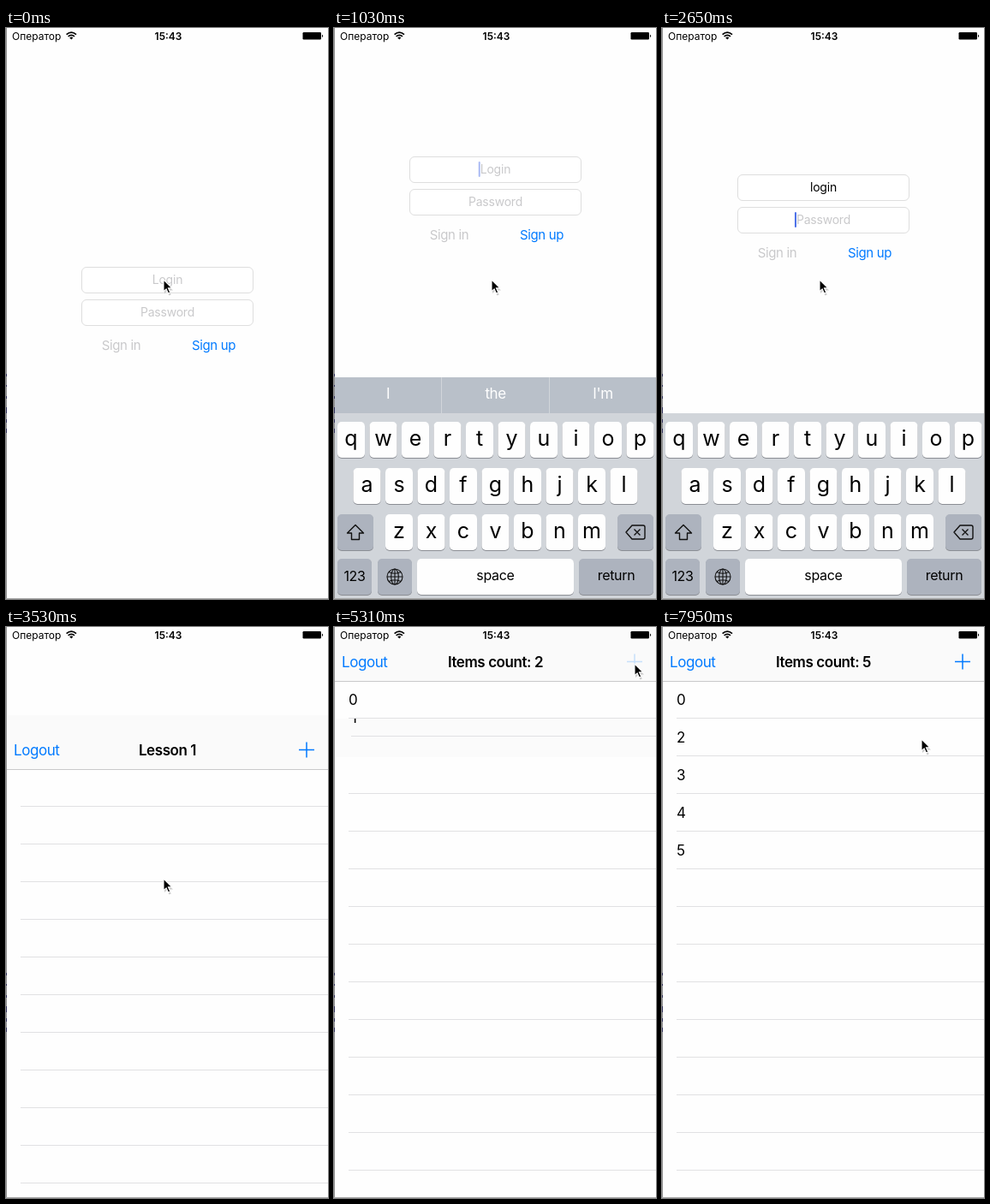
An HTML page for the animation above (8000 ms loop, 376x667 px).

```html
<!DOCTYPE html>
<html lang="en">
<head>
<meta charset="utf-8">
<title>Login and list</title>
<style>
  html, body { margin: 0; width: 100%; height: 100%; overflow: hidden; background: #fefefe; }
  svg { display: block; width: 100%; height: 100%; }
  text { font: 17px Inter, Roboto, sans-serif; letter-spacing: -.025em; white-space: pre; }
  .mid { text-anchor: middle; }
  .bold { font-weight: 600; }
  .small { font-size: 14px; letter-spacing: -.015em; }
  .link { font-size: 15px; }
  .status { font-size: 12px; letter-spacing: 0; }
  .letter { font-size: 25px; letter-spacing: 0; }
  .label { font-size: 16px; letter-spacing: -.02em; }
  .blue { fill: #007aff; }
  .hint { fill: #c9c9cb; }
  .field { fill: #fff; stroke: #dedede; }
  .icon { fill: none; stroke: #111; stroke-width: 1.4; stroke-linejoin: round; }
</style>
</head>
<body>
<svg viewBox="0 0 376 667">
  <rect width="376" height="667" fill="#fefefe"/>
  <g id="form">
    <rect class="field" x="88.5" y="279.5" width="200" height="30" rx="5.5"/>
    <rect class="field" x="88.5" y="317.5" width="200" height="30" rx="5.5"/>
    <text id="login" class="small mid" x="188.5" y="299"></text>
    <text id="password" class="small mid" x="188.5" y="337"></text>
    <text id="signIn" class="link mid" x="134.5" y="376">Sign in</text>
    <text class="link mid blue" x="242.5" y="376">Sign up</text>
    <rect id="caret" width="2" height="18" rx="1" fill="#4a6ee8"/>
  </g>
  <g id="sheet">
    <rect width="376" height="667" fill="#fefefe"/>
    <g id="list"></g>
    <rect width="376" height="63" fill="#fafafa"/>
    <rect y="63" width="376" height="1" fill="#c9c9ca"/>
    <text class="blue" x="9" y="47">Logout</text>
    <text id="title" class="mid bold" x="188.5" y="47"></text>
    <path id="plus" d="M342 40.5h18M351 31.5v18" stroke="#007aff" stroke-width="1.5"/>
  </g>
  <g id="keyboard"></g>
  <text class="status" x="7" y="13.5">Оператор</text>
  <g fill="none" stroke="#000" stroke-width="1.7">
    <path d="M70.6 7.6q5.7-5 11.4 0M72.6 9.9q3.7-3.2 7.4 0"/>
    <path d="M74.2 11.2q2.1-1.6 4.2 0l-2.1 2.3z" fill="#000" stroke="none"/>
  </g>
  <text class="status bold mid" x="189.5" y="13.5">15:43</text>
  <rect x="346.5" y="5" width="21.5" height="8.5" rx="1.2"/>
  <path d="M369 7.5q2.4 1.8 0 3.6z"/>
  <rect width="1" height="667" fill="#929292"/>
  <path d="M.5 404v3m0 10v2m0 11v3m0 10v7m0 7v4m0 7v5" stroke="#34345e"/>
  <rect y="666" width="376" height="1" fill="#a9a9a9"/>
  <g id="cursor">
    <path d="M1 2V16L4 13.2 6.5 18.5 8.8 17.5 6.4 12.4H11Z" fill="#000" opacity=".2"/>
    <path d="M0 0V13.6L3.1 10.8 5.5 16 7.8 15 5.5 9.9H9.8Z" stroke="#fff" stroke-width="1.1"/>
  </g>
</svg>
<script>
const LOOP = 8000, TICK = 147.2, ROW = 44;
const $ = id => document.getElementById(id);
const clamp = v => Math.max(0, Math.min(1, v));
const ease = v => { v = clamp(v); return v * v * (3 - 2 * v); };
const ramp = (t, start, length) => ease((t - start) / length);
// Critically damped spring, 0 to 1
const spring = ms => {
  const x = Math.max(0, ms) * .01826;
  return 1 - (1 + x) * Math.exp(-x);
};
const move = (id, x, y) => $(id).setAttribute('transform', `translate(${x} ${y})`);
const rect = (x, y, w, h, fill, more = '') =>
  `<rect x="${x}" y="${y}" width="${w}" height="${h}" fill="${fill}" ${more}/>`;
const text = (x, y, str, cls, fill = '#000') =>
  `<text x="${x}" y="${y}" class="${cls}" fill="${fill}">${str}</text>`;

function buildKeyboard() {
  const key = (x, y, w, fill, str = '', cls = 'letter', base = 28) =>
    rect(x, y + 1, w, 42, '#8b8e94', 'rx="5"') + rect(x, y, w, 42, fill, 'rx="5"') +
    text(x + w / 2, y + base, str, cls + ' mid');
  const row = (letters, x, y) =>
    [...letters].map((c, i) => key(x + i * 37.5, y, 32, '#fefefe', c)).join('');
  const grey = '#adb3be';
  const bar = rect(0, 408, 376, 42, '#b9c0c9') +
    rect(125, 408, 1, 42, '#d1d5da') + rect(251, 408, 1, 42, '#d1d5da') +
    ['I', 'the', "I'm"].map((w, i) => text(63 + i * 125.5, 433, w, 'mid', '#fff')).join('');
  $('keyboard').innerHTML = `<g id="bar">${bar}</g>` + rect(0, 450, 376, 217, '#d1d5da') +
    row('qwertyuiop', 4, 460) + row('asdfghjkl', 22.5, 514) + row('zxcvbnm', 60, 568) +
    key(4, 568, 42, grey) + key(331, 568, 42, grey) +
    key(4, 620, 40, grey, '123', 'label', 26) + key(51, 620, 40, grey) +
    key(97, 620, 183, '#fefefe', 'space', 'label', 25) +
    key(286, 620, 87, grey, 'return', 'label', 25) +
    `<g class="icon">
      <path d="M25 580.5l9.5 9.5h-5v7.5h-9v-7.5h-5z"/>
      <path d="M348 581h13q2 0 2 2v12q0 2-2 2h-13l-7-8zM350.5 585.5l7 7m0-7l-7 7"/>
      <g stroke-width="1.1"><circle cx="71" cy="641" r="9"/><ellipse cx="71" cy="641" rx="4.3" ry="9"/>
      <path d="M71 632v18M62 641h18M64 635.500q7 3.500 14 0M64 646.500q7-3.500 14 0"/></g>
    </g>`;
}

const pointer = [
  [0, 184, 294], [3880, 184, 294], [4420, 351, 43], [6010, 351, 43], [6480, 279, 132],
  [6600, 276, 132], [6920, 216, 132], [7210, 312, 132], [7420, 318, 132], [7950, 303, 131]
];
function pointerAt(t) {
  const i = pointer.findIndex(p => p[0] > t);
  const b = pointer[i < 0 ? pointer.length - 1 : i];
  const a = i < 0 ? b : pointer[i - 1];
  const k = a === b ? 0 : ramp(t, a[0], b[0] - a[0]);
  return [a[1] + (b[1] - a[1]) * k, a[2] + (b[2] - a[2]) * k];
}

const FOCUS = 420, TYPE = 1470, TAB = 2200, SUBMIT = 3350, DELETE = 7400;
const inserts = [4705, 5154, 5400, 5600, 5800, 6000];

function drawForm(t) {
  const shown = spring(t - FOCUS) - spring(t - SUBMIT);
  const bar = 1 - ramp(t, TAB - 60, 280);
  move('keyboard', 0, (1 - shown) * 259);
  move('bar', 0, (1 - bar) * 42);
  const lift = Math.round(shown * (217 + 42 * bar) / 2);
  move('form', 0, -lift);

  const typed = 'login'.slice(0, t < TYPE ? 0 : Math.floor((t - TYPE) / TICK) + 1);
  const dots = '•'.repeat(t < 2790 ? 0 : Math.min(5, 2 * Math.floor((t - 2790) / TICK) + 2));
  const fill = (id, value, hint) => {
    $(id).textContent = value || hint;
    $(id).classList.toggle('hint', !value);
  };
  fill('login', typed, 'Login');
  fill('password', dots, 'Password');
  $('signIn').setAttribute('class', 'link mid ' + (dots.length > 3 ? 'blue' : 'hint'));

  const second = t >= TAB;
  const width = $(second ? 'password' : 'login').getComputedTextLength();
  const after = second ? dots : typed;
  const caret = $('caret');
  caret.setAttribute('x', 188.5 + (after ? width / 2 + .5 : -width / 2 - 2));
  caret.setAttribute('y', second ? 323 : 285);
  const blink = t < TYPE ? 1 - clamp((t - 920) / 210) : 1;
  caret.setAttribute('opacity', t < FOCUS ? 0 : blink);
}

function drawList(t, pointerX) {
  move('sheet', 0, Math.round(667 * (1 - spring(t - SUBMIT))));
  const added = inserts.filter(s => t >= s).length;
  const gone = ramp(t, DELETE, 300);
  const count = added - (t >= DELETE ? 1 : 0);
  $('title').textContent = count ? `Items count: ${count}` : 'Lesson 1';
  const pressed = inserts.some(s => t > s - 145 && t < s);
  $('plus').setAttribute('opacity', pressed ? .2 : 1);

  const line = (x, y) => rect(x, y, 376 - x, 1, '#e1e1e3');
  let back = '', rows = '';
  for (let i = 0; i < 13; i++) {
    const top = 63 + i * ROW;
    const p = i < added ? ramp(t, inserts[i], 300) : 1;
    back += p < 1 ? rect(0, top, 376, 45, '#fbfbfb') : line(17, top + 43);
    if (i >= added || (i === 1 && gone === 1)) continue;
    const y = Math.round(top - ROW * (1 - p) - (i ? ROW * gone : 0));
    let dx = Math.round(6 * (1 - p)), button = '';
    if (i === 1 && t > 6600) {
      dx = t < 6920 ? Math.min(0, pointerX - 276) : -61 - 13 * ramp(t, 6920, 140);
      button = rect(376 + dx, y, 74, 43, '#ff3b30') + text(383 + dx, y + 28, 'Delete', '', '#fff');
    }
    // Upper rows cover the lower ones sliding beneath them
    rows = rect(0, y, 376, ROW, p < 1 ? '#fbfbfb' : '#fefefe') + button +
      text(17 + dx, y + 28, i, '') + line(Math.max(0, 17 + dx), y + 43) + rows;
  }
  $('list').innerHTML = back + rows;
}

let last = -1;
function frame(now) {
  const tick = Math.floor((now % LOOP + 7) / TICK);
  if (tick !== last) {
    last = tick;
    const t = tick * TICK, [x, y] = pointerAt(t);
    drawForm(t);
    drawList(t, x);
    move('cursor', x, y);
  }
  requestAnimationFrame(frame);
}

buildKeyboard();
const start = performance.now();
frame(0);
requestAnimationFrame(function run(now) { frame = frame; });
</script>
</body>
</html>
```
